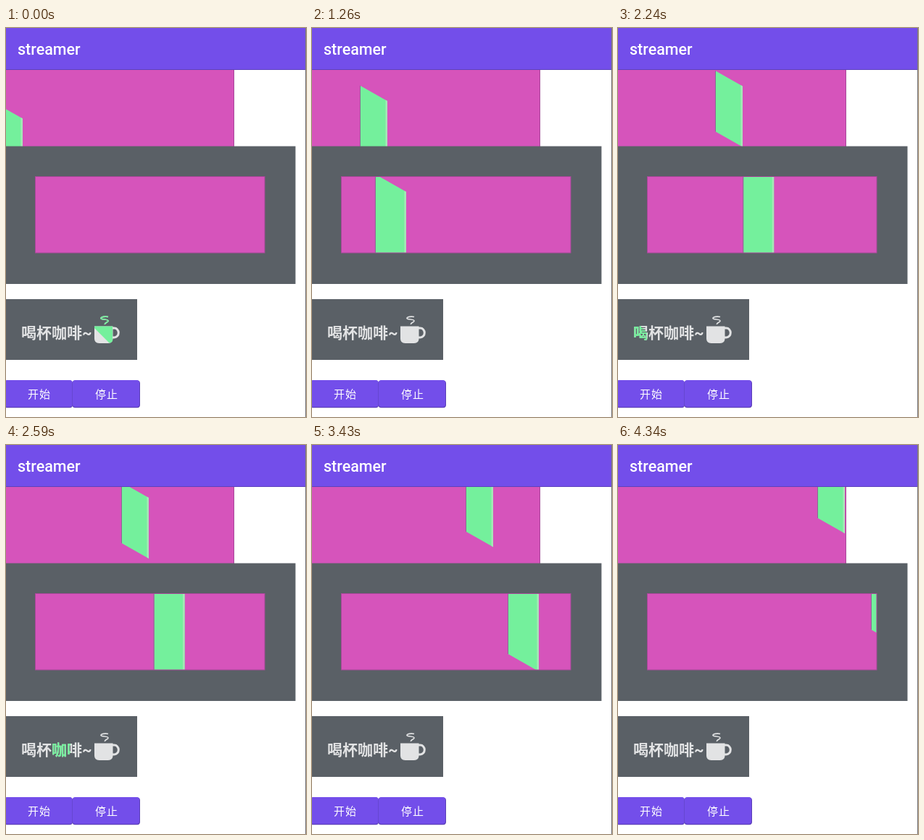
An HTML page for the animation above (4410 ms loop, 414x538 px).

```html
<!DOCTYPE html>
<html lang="zh">
<head>
<meta charset="utf-8">
<title>streamer</title>
<style>
  @property --x { syntax: "<number>"; inherits: true; initial-value: -14; }
  @property --c { syntax: "<number>"; inherits: true; initial-value: 120; }

  html, body { margin: 0; width: 100%; height: 100%; overflow: hidden; background: #fff; }
  svg {
    display: block;
    width: 414px;
    height: 538px;
    animation: sweep 4410ms infinite, shine 4410ms infinite;
  }

  /* 63 ticks of 70 ms; each segment steps once per tick */
  @keyframes sweep {
    0%       { --x: -14; animation-timing-function: steps(11); }
    17.4603% { --x: 36;  animation-timing-function: steps(7); }
    28.5714% { --x: 67;  animation-timing-function: steps(8); }
    41.2698% { --x: 105; animation-timing-function: steps(11); }
    58.7302% { --x: 160; animation-timing-function: steps(12); }
    77.7778% { --x: 213; animation-timing-function: steps(13); }
    98.4127%, 100% { --x: 276; }
  }
  @keyframes shine {
    0%       { --c: 120; animation-timing-function: steps(11); }
    17.4603% { --c: 229; animation-timing-function: step-end; }
    41.2698% { --c: -46; animation-timing-function: steps(11); }
    58.7302% { --c: 62;  animation-timing-function: steps(12); }
    77.7778%, 100% { --c: 180; }
  }

  .upper { transform: translate(calc(1px * var(--x)), calc(100px - .3px * var(--x))); }
  .lower { transform: translate(calc(3.9px + 1.254px * var(--x)), calc(238.1px - .53px * var(--x))); }
  .glint { transform: translate(calc(1px * var(--c)), calc(461px - .4px * var(--c))); }

  .pink { fill: #d654bb; }
  .gray { fill: #5a6066; }
  .violet { fill: #734eea; }
  .band { fill: #74f09c; }
  .light { fill: #a5e8b7; }
  .dark { fill: #8b6a92; }
  .edge { fill: none; stroke: #a8489a; stroke-width: 1; }
  text { fill: #fff; font-family: Roboto, "Noto Sans CJK SC", "Noto Sans CJK", sans-serif; }
  .title { font-size: 21.5px; font-weight: 500; }
  .label { font-size: 15px; letter-spacing: .9px; }
  .drink text { fill: inherit; font-size: 21px; font-weight: 700; }
  .drink path { stroke: inherit; }
</style>
</head>
<body>
<svg viewBox="0 0 414 538">
  <defs>
    <clipPath id="upperBox"><rect y="58" width="315" height="106"/></clipPath>
    <clipPath id="lowerBox"><rect x="41" y="206" width="316" height="105"/></clipPath>
    <clipPath id="glintClip"><path class="glint" d="M0-62 27-35V27L0 0z"/></clipPath>

    <g id="drink" class="drink">
      <text x="21" y="429">喝杯咖啡~</text>
      <path d="M122 412.5h25.500v17q0 6.500-6.500 6.500h-12.500q-6.500 0-6.500-6.500z" stroke="none"/>
      <path d="M147 415h2.500a5.800 6.500 0 0 1 0 13h-2.500" fill="none" stroke-width="3"/>
      <path d="M141 399.500c-4-1-10 0-10 2s10 1 10 3.500-5 2-4.500 5" fill="none" stroke-width="1.700"/>
    </g>
  </defs>

  <rect width="414" height="538" fill="#fff"/>

  <g clip-path="url(#upperBox)">
    <rect class="pink" y="58" width="315" height="106"/>
    <g class="upper">
      <path class="band" d="M0 0 37 21V105L0 84z"/>
      <path class="light" d="M34.500 19.600 37 21V105L34.500 103.600z"/>
      <path class="dark" d="M-1-.5 0 0V84L-1 83.500z"/>
    </g>
    <path class="edge" d="M314.500 58V164"/>
  </g>

  <rect class="gray" y="163.500" width="399.500" height="190.500"/>
  <g clip-path="url(#lowerBox)">
    <rect class="pink" x="41" y="206" width="316" height="105"/>
    <g class="lower">
      <path class="band" d="M0 0 42 24V188L0 164z"/>
      <path class="light" d="M39.500 22.600 42 24V188L39.500 186.600z"/>
      <path class="dark" d="M-1-.5 0 0V164L-1 163.500z"/>
    </g>
  </g>
  <rect class="edge" x="40.500" y="205.500" width="316.500" height="105.500"/>

  <rect class="gray" y="375" width="181" height="84"/>
  <use href="#drink" fill="#e2e3e4" stroke="#e2e3e4" stroke-width="0"/>
  <g clip-path="url(#glintClip)">
    <use href="#drink" fill="#74f09c" stroke="#74f09c" stroke-width="0"/>
  </g>

  <g fill="#5b3fb8">
    <rect x="-2" y="487.500" width="94" height="37.800" rx="4"/>
    <rect x="91.500" y="487.500" width="93.500" height="37.800" rx="4"/>
  </g>
  <rect class="violet" x="-2" y="487" width="93.500" height="37" rx="3.500"/>
  <rect class="violet" x="92" y="487" width="92" height="37" rx="3.500"/>
  <text class="label" x="30" y="512">开始</text>
  <text class="label" x="123" y="512">停止</text>

  <rect class="violet" width="414" height="57.500"/>
  <rect y="57" width="414" height="1" fill="#5d42bd"/>
  <text class="title" x="16" y="37">streamer</text>
  <rect x="413" width="1" height="538" fill="#77777c"/>
</svg>
</body>
</html>
```
